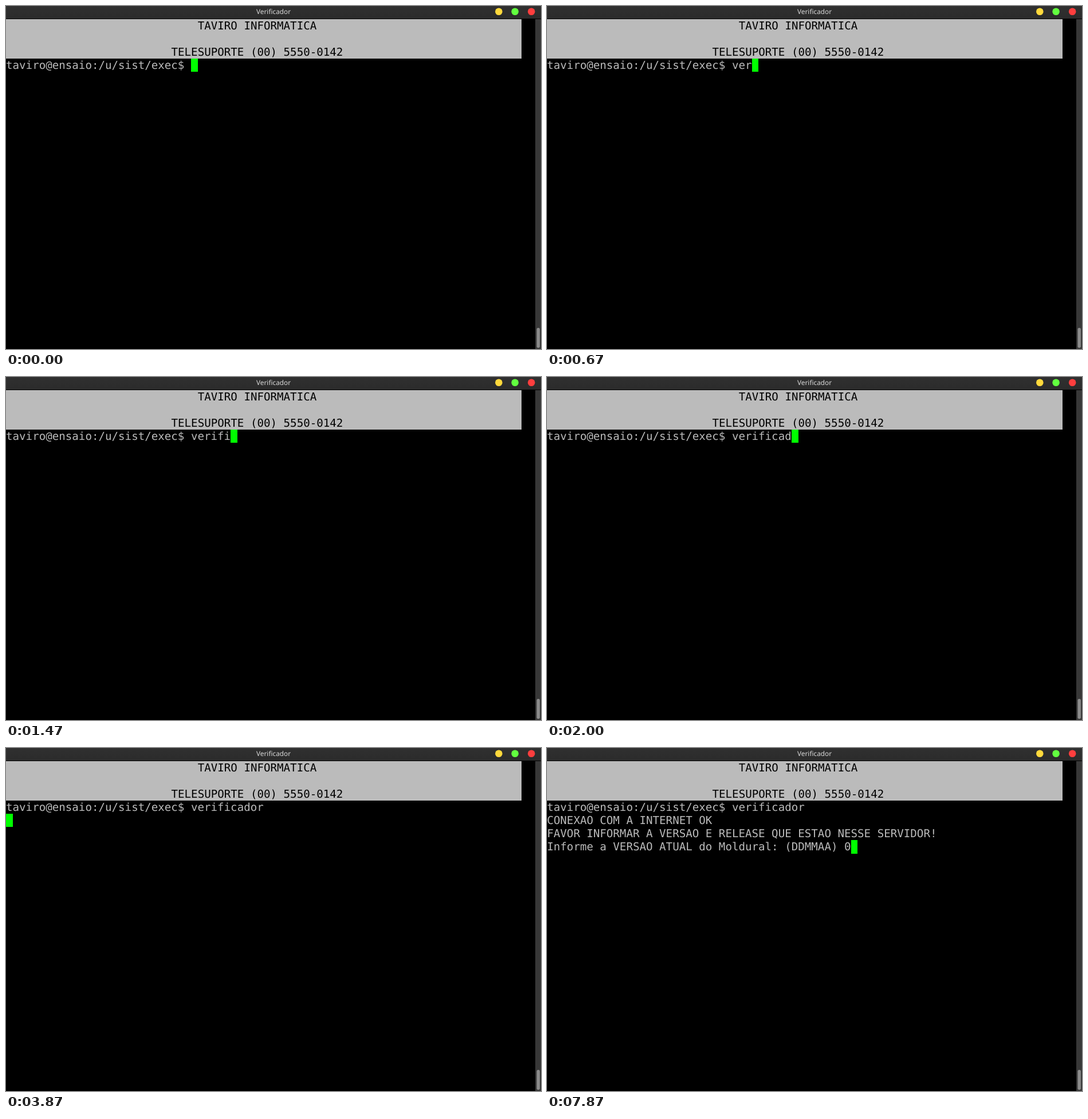
Write an HTML page that moves like this. It is 934 px wide and 600 px high and loops after 8000 ms.

```html
<!DOCTYPE html>
<html lang="pt">
<head>
<meta charset="utf-8">
<style>
  html, body { margin: 0; width: 100%; height: 100%; overflow: hidden; background: #000; }
  svg { display: block; }
  text { white-space: pre; text-rendering: geometricPrecision; }
  .term text { font: 19.17px "DejaVu Sans Mono", monospace; fill: #bbb; }
  .term .banner { fill: #000; }
  .title { font: 500 11.8px "Noto Sans", sans-serif; fill: #dadada; text-anchor: middle; }
</style>
</head>
<body>
<svg width="934" height="600" viewBox="0 0 934 600">
  <defs>
    <linearGradient id="bar" x2="0" y2="1">
      <stop stop-color="#303030"/>
      <stop offset="1" stop-color="#2b2b2b"/>
    </linearGradient>
  </defs>
  <rect width="934" height="600"/>
  <rect width="934" height="22" fill="url(#bar)"/>
  <text class="title" x="467" y="14">Verificador</text>
  <circle cx="860.3" cy="9.8" r="6.3" fill="#ffd93c"/>
  <circle cx="888.6" cy="9.8" r="6.3" fill="#62ff3f"/>
  <circle cx="917.2" cy="9.8" r="6.3" fill="#ff3e3e"/>
  <rect x="924" y="23" width="10" height="577" fill="#383838"/>
  <rect x="926.5" y="563" width="5.5" height="35" rx="2.75" fill="#8c8c8c"/>
  <rect y="23" width="900" height="69" fill="#bbb"/>
  <g class="term" id="term"><rect id="cursor" fill="#0f0"/></g>
</svg>
<script>
const LOOP = 8000, COL = 11.54, ROW = 23.08, TOP = 23;
const PROMPT = 'taviro@ensaio:/u/sist/exec$ ';
const COMMAND = 'verificador';
const KEYS = [330, 530, 670, 1000, 1200, 1470, 1730, 1870, 2000, 2200, 2470];
const ENTER = 3870, REPLY = 7000, DIGIT = 7870;

const term = document.getElementById('term');
const cursor = document.getElementById('cursor');

function addLine(row, col = 0, content = '', cls = '') {
  const line = document.createElementNS('http://www.w3.org/2000/svg', 'text');
  line.setAttribute('x', col * COL);
  line.setAttribute('y', TOP + row * ROW + 18);
  line.setAttribute('class', cls);
  line.textContent = content;
  return term.appendChild(line);
}

function placeCursor(row, col) {
  const x = Math.round(col * COL), y = Math.round(TOP + row * ROW);
  cursor.setAttribute('x', x);
  cursor.setAttribute('y', y);
  cursor.setAttribute('width', Math.round((col + 1) * COL) - x);
  cursor.setAttribute('height', Math.round(TOP + (row + 1) * ROW) - y);
}

addLine(0, 29, 'TAVIRO INFORMATICA', 'banner');
addLine(2, 25, 'TELESUPORTE (00) 5550-0142', 'banner');
const lines = [3, 4, 5, 6].map(row => addLine(row));

function screenAt(t) {
  const typed = KEYS.filter(key => t >= key).length;
  const screen = [PROMPT + COMMAND.slice(0, typed)];
  if (t >= REPLY) {
    screen.push('CONEXAO COM A INTERNET OK',
      'FAVOR INFORMAR A VERSAO E RELEASE QUE ESTAO NESSE SERVIDOR!',
      'Informe a VERSAO ATUAL do Moldural: (DDMMAA) ' + (t >= DIGIT ? '0' : ''));
  } else if (t >= ENTER) {
    screen.push('');
  }
  return screen;
}

let start;
function draw(now) {
  start ??= now;
  const screen = screenAt((now - start) % LOOP);
  lines.forEach((line, i) => line.textContent = screen[i] || '');
  placeCursor(2 + screen.length, screen.at(-1).length);
  requestAnimationFrame(draw);
}
requestAnimationFrame(draw);
</script>
</body>
</html>
```
